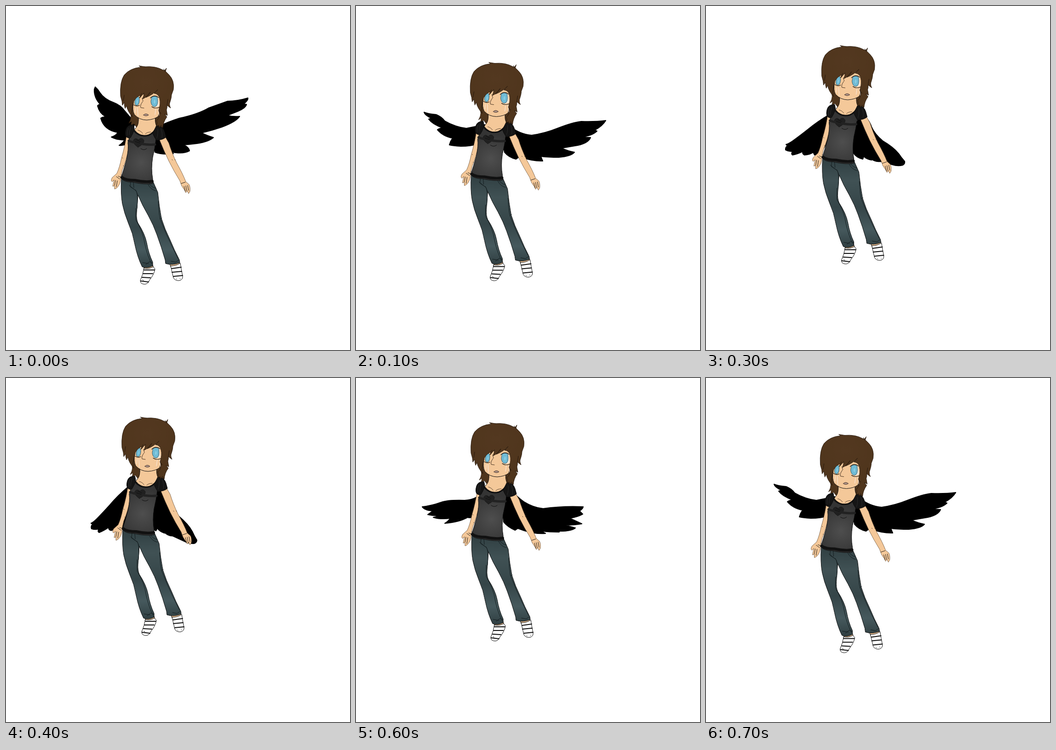
An HTML page with a canvas for the animation above (0.8 s loop, 748 by 748 pixels).

```html
<!DOCTYPE html>
<html lang="en">
<head>
<meta charset="utf-8">
<title>Winged girl</title>
<style>
html, body { margin: 0; width: 100%; height: 100%; overflow: hidden; background: #fff; }
canvas { display: block; width: 748px; height: 748px; }
</style>
</head>
<body>
<canvas id="stage" width="748" height="748"></canvas>
<script>
const ctx = document.getElementById('stage').getContext('2d');
const STEP = 100;
const ORDER = [0, 1, 2, 3, 4, 3, 2, 1];

// Wings in stage coordinates
const WINGS = {
  up: [
    'M194 176 Q200 181 204 188 Q213 202 234 210 Q250 216 258 228 Q270 241 280 256 L264 300 Q255 304 246 303 Q254 298 258 291 Q241 292 229 285 Q239 282 243 275 Q213 270 206 244 Q210 241 217 241 Q203 233 199 217 Q201 214 205 214 Q191 199 192 181 Z',
    'M332 262 Q352 252 377 244 Q418 235 440 222 L482 207 Q503 207 526 200 Q527 205 517 213 L523 214 Q521 222 504 229 L481 238 Q493 241 508 240 Q500 252 470 263 Q447 271 425 276 Q440 283 451 286 Q441 295 415 299 Q399 301 386 302 Q398 307 399 315 Q385 323 358 317 L364 321 Q340 324 324 318 L318 290 Z'
  ],
  level: [
    'M148 231 Q158 235 174 236 Q185 240 193 250 Q216 263 240 266 L280 258 L264 300 Q250 305 228 305 Q211 304 203 302 Q205 294 210 287 Q190 284 177 269 Q181 266 188 265 Q166 257 158 246 L164 244 Q150 238 148 231 Z',
    'M332 260 Q356 279 382 281 Q411 277 438 266 Q471 253 490 251 Q520 252 543 249 Q536 261 519 270 L524 272 Q514 282 489 285 L510 286 Q505 298 482 303 L447 309 Q462 316 475 318 Q468 327 441 329 Q418 329 402 327 Q404 332 406 337 Q386 338 355 328 L348 333 Q332 329 323 318 L318 290 Z'
  ],
  low: [
    'M144 280 Q164 278 186 270 Q200 265 236 266 Q252 265 262 259 L280 245 L262 298 Q251 306 243 303 Q224 314 193 316 Q200 312 205 305 Q184 308 168 303 L184 299 Q168 300 156 297 L167 289 Q149 288 144 280 Z',
    'M334 240 Q350 259 365 269 Q386 282 407 284 Q448 278 494 280 Q493 285 486 289 L493 296 Q483 302 465 305 L491 317 Q475 320 455 320 L477 326 Q468 334 437 333 L442 335 Q421 335 402 333 L412 338 Q384 340 352 327 L346 331 Q330 324 321 313 L318 280 Z'
  ],
  folded: [
    'M268 236 Q241 252 222 268 Q203 283 189 293 Q179 300 174 301 L177 304 Q172 307 173 313 Q180 317 189 316 Q184 321 188 324 Q199 322 211 316 Q208 321 214 324 Q227 323 233 318 Q235 322 236 324 Q250 321 258 306 L275 270 Z',
    'M336 232 Q356 248 360 263 Q367 279 384 293 Q408 307 419 321 Q425 330 432 338 Q433 343 428 346 Q417 349 405 345 L379 338 Q368 340 357 331 L360 335 Q349 333 343 327 L341 333 Q327 330 320 319 L318 280 Z'
  ]
};

const POSES = [
  { x: 0, y: 0, wings: 'up' },
  { x: -.5, y: -7.5, wings: 'level' },
  { x: 1, y: -33, wings: 'low' },
  { x: 2.5, y: -44, wings: 'folded' },
  { x: 3, y: -45, wings: 'folded', fold: .17 }
];

for (const key in WINGS) WINGS[key] = WINGS[key].map(d => new Path2D(d));

function withStops(gradient, ...stops) {
  stops.forEach(([at, color]) => gradient.addColorStop(at, color));
  return gradient;
}

const glow = (x, y, r, inner, outer) =>
  withStops(ctx.createRadialGradient(x, y, 0, x, y, r), [0, inner], [1, outer]);

const SKIN = '#f4c899', HAIR = '#4f351c', INK = '#0b0b0b', SEAM = '#141d1f';
const JEANS = withStops(ctx.createLinearGradient(0, 376, 0, 568),
  [0, '#303f42'], [.25, '#405154'], [.55, '#354548'], [.8, '#46595d'], [1, '#303f42']);
const SHIRT = glow(294, 340, 56, '#4e4e4e', '#343434');

const shape = (d, fill, stroke = INK, width = 1) => ({ path: new Path2D(d), fill, stroke, width });
const line = (d, color = INK, width = 1) => shape(d, null, color, width);

const BODY = [
  // back hair and neck
  shape('M262 200 L268 228 Q276 240 267 255 L273 251 L271 261 L278 256 L284 264 L300 258 L318 256 L328 265 L334 260 L340 266 L346 235 L345 195 Z', HAIR, '#2a1a0c', .8),
  shape('M288 241 Q289 257 284 263 Q279 268 277 275 Q299 292 321 280 L328 262 Q323 254 325 240 Z', SKIN),
  line('M287 270 Q294 272 297 277 M303 278 Q307 274 315 274', '#5b4632'),

  // arms
  shape('M262 282 Q259 304 251 331 Q247 351 241 364 L231 373 Q227 380 231 382 L235 378 L232 392 L236 391 L236 398 Q242 397 247 387 Q250 379 249 373 L253 356 Q262 335 267 308 L272 284 Z', SKIN, '#6b5138', .8),
  line('M238 379 L236 390 M242 380 L240 393 M240 371 L247 376 M244 370 L249 372', INK, .9),
  line('M253 330 l1 1 M255 347 l1 1', '#3b2a1c'),
  shape('M333 289 Q343 314 354 337 Q365 359 378 380 Q381 392 388 400 L391 406 L394 402 L397 408 L400 403 Q401 393 398 388 L391 382 Q385 366 371 341 Q360 318 354 298 L346 284 Z', SKIN, '#6b5138', .8),
  line('M381 386 L390 383 M391 391 L393 402 M395 390 L397 401 M387 392 L390 403', INK, .9),
  line('M361 334 l1 1 M367 334 l1 1', '#3b2a1c'),

  // feet
  shape('M302 564 L299 573 L322 572 L318 560 Z', SKIN),
  shape('M300 570 Q298 584 292 597 Q292 605 302 605 Q309 604 312 596 Q322 584 324 572 L320 567 Q310 573 300 570 Z', '#fff'),
  line('M300 574 L323 574 M298 582 L319 582 M296 590 L314 591 M293 598 L310 600', INK, 1.9),
  line('M297 595 l2 2'),
  shape('M356 561 L359 569 L379 564 L376 557 Z', SKIN),
  shape('M358 565 Q361 578 364 591 Q368 598 377 597 Q385 595 384 587 Q381 573 379 559 Q369 566 358 565 Z', '#fff'),
  line('M360 571 L381 568 M361 579 L382 577 M364 588 L384 586', INK, 1.9),
  line('M370 593 l1 1 M378 592 l1 1'),

  // jeans
  shape('M251 374 Q249 408 253 430 Q257 450 266 472 Q276 494 280 518 Q286 547 296 567 Q306 572 319 565 L319 557 Q310 538 306 515 Q302 495 287 472 Q283 463 284 450 L287 411 Q296 433 309 455 Q321 477 328 497 Q338 524 346 552 L347 560 Q362 565 378 558 L377 552 Q366 531 357 509 Q345 485 338 462 Q333 436 330 405 L319 380 Z', JEANS),
  line('M271 382 L270 393 L282 401 M277 383 L278 395 M268 390 L283 402 L287 412 M282 400 Q288 408 285 440 M309 388 Q314 399 326 402 M312 387 Q317 395 326 396', SEAM),
  line('M282 440 L282 465 Q298 490 302 518 Q308 545 317 561 M331 425 Q332 450 335 463 L339 461 M335 463 Q347 494 360 521 L374 549 M304 562 L312 556 L319 559 M359 555 L369 557 L376 552 M297 558 L310 560', SEAM),

  // shirt
  shape('M278 268 L268 284 Q268 292 265 297 Q267 311 262 334 Q256 356 250 374 Q256 383 275 383 Q302 389 319 386 L319 376 Q315 354 319 329 Q324 309 326 290 L332 276 L328 264 Q321 277 310 281 Q291 286 278 268 Z', SHIRT),
  line('M252 373 Q261 379 280 379 Q304 384 318 381', '#111', 6),
  line('M251 367 Q257 376 266 377', '#161616'),
  line('M278 271 Q291 286 310 281 Q322 276 328 263', '#101010', 3),
  shape('M287 307 Q276 300 277 292 Q281 285 288 291 Q295 284 300 292 Q301 300 287 307 Z', '#202020', '#191919'),
  line('M267 293 Q276 297 285 297 Q304 303 324 301', '#222', 5),
  line('M281 295 L291 298 M284 291 L292 295 M293 310 Q300 315 306 310', '#0d0d0d'),
  shape('M277 258 Q264 258 261 268 Q258 278 261 284 Q266 289 271 286 Q277 277 279 267 Z', '#151515'),
  shape('M327 261 Q341 260 345 274 L348 285 Q342 291 327 292 Q321 283 319 277 Z', '#151515'),
  line('M266 266 Q263 274 264 281 M271 264 Q268 272 268 280 M330 267 Q331 278 328 287 M337 267 Q341 278 339 286', '#303030', .8),

  // face
  shape('M275 185 L277 211 Q274 226 279 236 Q290 248 306 248 Q322 247 331 240 Q336 224 337 200 L333 180 Z', SKIN),
  shape('M283 197 Q291 194 290 206 Q289 216 284 216 Q279 215 280 208 Z', '#70bbd5', '#23424d', .8),
  shape('M315 198 Q324 193 331 200 L333 217 Q325 222 317 217 Z', '#eee9df', null),
  shape('M317 198 Q324 194 329 199 Q332 218 323 219 Q316 218 315 208 Z', '#70bbd5', '#23424d', .8),
  shape('M286 203 Q288 207 286 212 Q283 210 286 203 Z M323 203 Q327 207 323 213 Q319 209 323 203 Z', '#88cde3', null),
  line('M314 200 Q323 192 332 199 M317 219 Q325 225 336 219 M278 215 Q284 219 290 216', INK, 1.2),
  line('M296 200 L298 207 M297 208 Q291 216 293 221 L300 222 M296 193 Q302 189 306 188', '#46311f'),
  shape('M299 237 Q304 232 310 237 Q304 241 299 237 Z', '#b2958a', '#35261f', .9),
  line('M282 221 L281 232 M286 221 L287 239 M326 223 L324 236 M331 223 L333 238', '#f9e5d5', 1.2),

  // front hair
  shape('M302 132 L289 130 L293 133 Q270 135 257 150 Q247 165 249 196 L252 207 L253 216 L257 210 Q257 217 259 223 L262 217 Q264 229 275 241 L273 231 Q275 216 278 207 Q283 198 292 194 L291 200 L300 189 Q300 195 297 202 Q306 199 314 187 L304 199 Q319 193 330 182 L322 190 Q332 191 334 201 Q337 212 332 227 Q338 239 327 250 Q331 254 326 262 L332 259 L333 265 L337 259 L341 265 Q342 252 350 241 L345 235 L351 238 L349 226 Q351 220 350 216 L358 222 Q354 214 357 208 Q360 199 360 193 L364 182 Q367 162 354 149 L347 142 L349 135 L345 140 L341 139 Q325 130 302 132 Z', glow(305, 165, 75, '#533820', HAIR), '#1c1108', .8),
  line('M332 228 L337 234 M343 137 L346 143 M255 206 L257 194 M350 216 L352 203 M290 200 L295 190', '#21140a', .9)
];

function paint({ path, fill, stroke, width }) {
  if (fill) {
    ctx.fillStyle = fill;
    ctx.fill(path);
  }
  if (stroke) {
    ctx.strokeStyle = stroke;
    ctx.lineWidth = width;
    ctx.stroke(path);
  }
}

function drawWings({ wings, fold = 0 }) {
  WINGS[wings].forEach((path, right) => {
    const [x, y] = right ? [338, 245] : [266, 245];
    ctx.save();
    ctx.translate(x, y);
    ctx.rotate(right ? fold : -fold);
    ctx.translate(-x, -y);
    paint({ path, fill: '#000', stroke: '#000', width: 2 });
    ctx.restore();
  });
}

function drawBody({ x, y }) {
  ctx.save();
  ctx.translate(x, y);
  BODY.forEach(paint);
  ctx.restore();
}

ctx.lineJoin = ctx.lineCap = 'round';
const start = performance.now();

function frame() {
  const time = Math.max(0, performance.now() - start);
  const pose = POSES[ORDER[Math.floor(time / STEP) % ORDER.length]];
  ctx.fillStyle = '#fff';
  ctx.fillRect(0, 0, 748, 748);
  drawWings(pose);
  drawBody(pose);
  requestAnimationFrame(frame);
}
frame();
</script>
</body>
</html>
```
